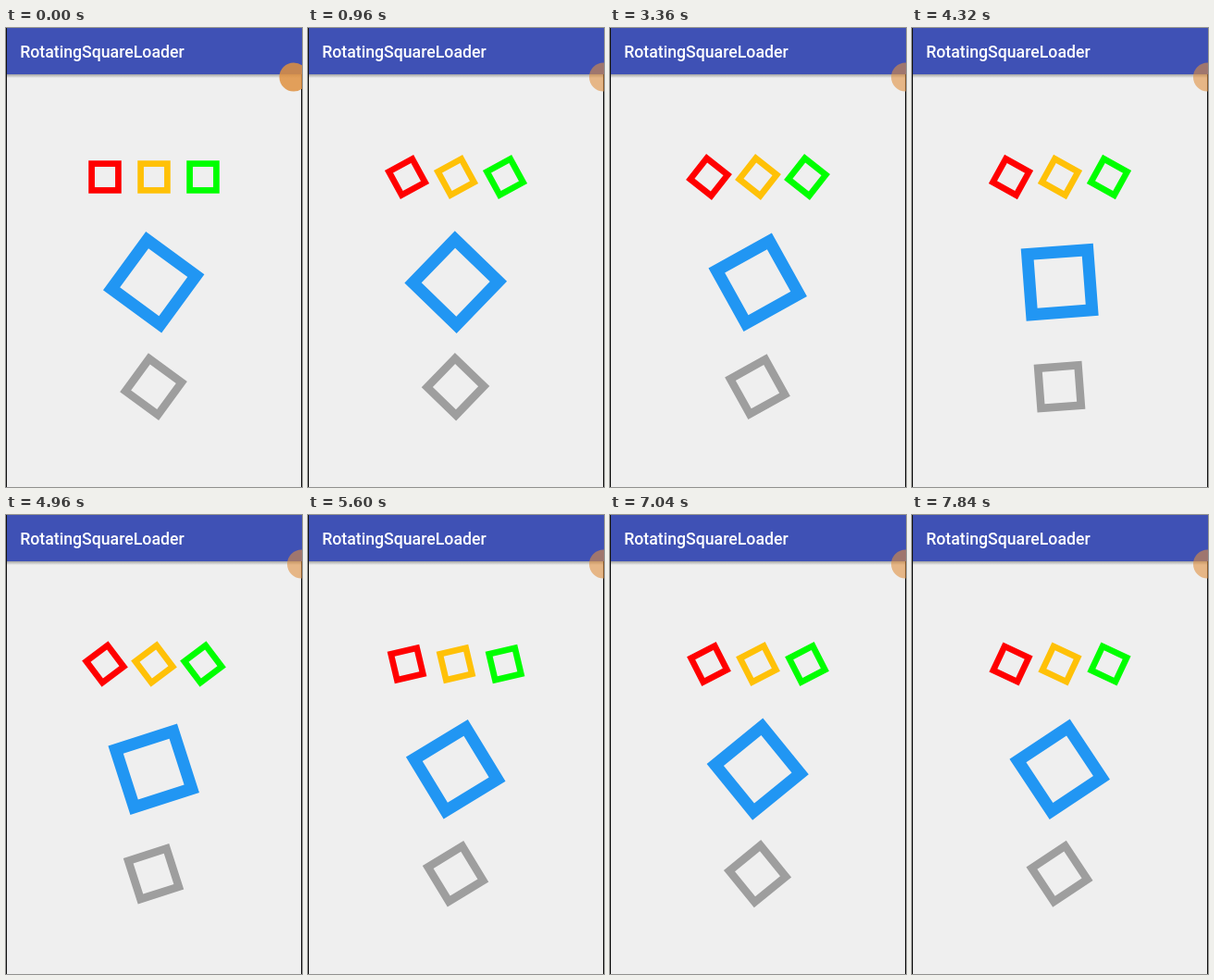
Recreate the animation shown at these times as an HTML page. Size 320x496 px, loop 8 s.

```html
<!DOCTYPE html>
<html lang="en">
<head>
<meta charset="utf-8">
<title>RotatingSquareLoader</title>
<style>
  html, body { margin: 0; width: 100%; height: 100%; overflow: hidden; background: #efefef; }
  svg { display: block; width: 100%; height: 100%; }
  text { font: 500 17.7px Roboto, sans-serif; fill: #fff; }
</style>
</head>
<body>
<svg viewBox="0 0 320 496">
  <defs>
    <linearGradient id="shadow" x2="0" y2="1">
      <stop offset="0" stop-color="#000" stop-opacity=".32"/>
      <stop offset="1" stop-color="#000" stop-opacity="0"/>
    </linearGradient>
  </defs>
  <rect width="320" height="496" fill="#efefef"/>
  <rect y="50" width="320" height="4" fill="url(#shadow)"/>
  <rect width="320" height="50" fill="#3f51b5"/>
  <text x="15.2" y="31.8">RotatingSquareLoader</text>
  <g id="loaders" fill="none"></g>
  <path d="M.5 0V496M319.5 50V496" stroke="#111"/>
  <circle id="bubble" cy="53" r="15.5" fill="#df9040"/>
</svg>
<script>
const STEP = 160, LOOP = 8000;
const bubble = document.getElementById('bubble');

// Both loaders turn evenly, after a short hitch at the start of the loop.
const fast = n => n ? 70.65 + 28.458 * n : 0;
const slow = n => n ? 19.3 + 19.125 * n : 36.2;

function addSquare(x, y, side, line, color, angle) {
  const rect = document.createElementNS('http://www.w3.org/2000/svg', 'rect');
  const size = side - line;
  const attributes = { x: x - size / 2, y: y - size / 2, width: size, height: size, stroke: color, 'stroke-width': line };
  for (const name in attributes) rect.setAttribute(name, attributes[name]);
  document.getElementById('loaders').append(rect);
  return n => rect.setAttribute('transform', `rotate(${angle(n)} ${x} ${y})`);
}

const squares = [
  addSquare(107, 161, 35.5, 6.7, '#ff0000', fast),
  addSquare(160, 161, 35.5, 6.7, '#ffc107', fast),
  addSquare(213, 161, 35.5, 6.7, '#00ff00', fast),
  addSquare(159.7, 274.7, 78.3, 13, '#2196f3', slow),
  addSquare(159.5, 387.7, 52, 8.6, '#9e9e9e', slow)
];

function draw(now) {
  const n = Math.floor(now % LOOP / STEP);
  squares.forEach(turn => turn(n));
  const away = Math.min(n / 3, 1);
  bubble.setAttribute('cx', 311 + 8.5 * away);
  bubble.setAttribute('opacity', 0.85 - 0.25 * away);
}

const start = performance.now();
function tick() {
  draw(performance.now() - start);
  requestAnimationFrame(tick);
}
tick();
</script>
</body>
</html>
```
